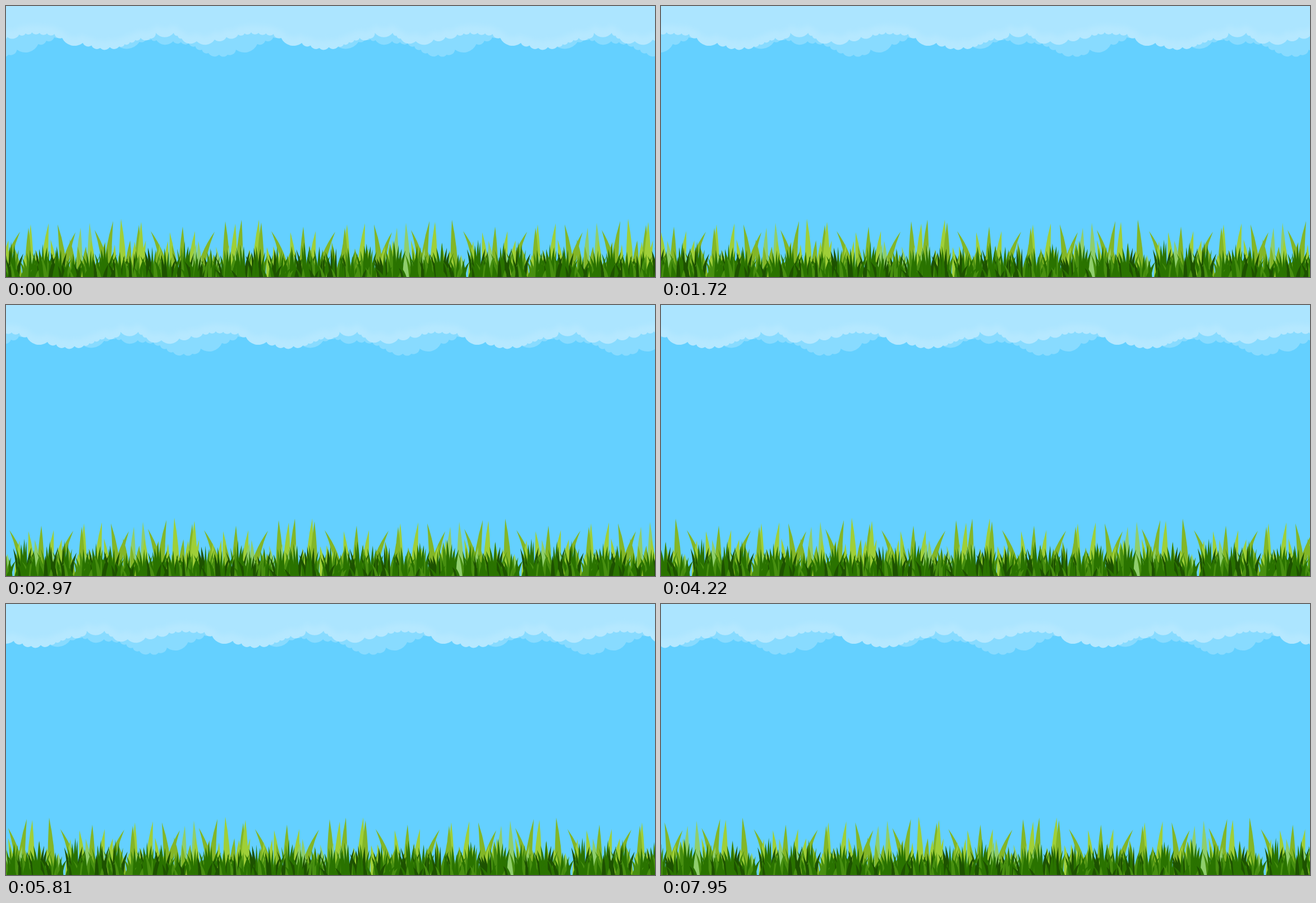
An HTML page that plays this animation: 1157 px wide and 484 px high, repeating every 8 s.

```html
<!DOCTYPE html>
<html lang="en">
<head>
<meta charset="utf-8">
<title>Meadow</title>
<style>
html, body { margin: 0; width: 100%; height: 100%; overflow: hidden; background: #64d0ff; }
svg { display: block; width: 100%; height: 100%; }
</style>
</head>
<body>
<svg viewBox="0 0 1157 484" preserveAspectRatio="none">
  <defs>
    <filter id="soft" x="-5%" y="-20%" width="110%" height="140%"><feGaussianBlur stdDeviation="4"/></filter>
  </defs>
  <rect width="1157" height="484" fill="#64d0ff"/>
  <g id="clouds"></g>
  <g id="grass"></g>
</svg>
<script>
const LOOP = 8000;
const CLOUD_W = 390.5, CLOUD_SPEED = -0.0212;
const GRASS_W = 904, GRASS_SPEED = 0.032;
const FLOOR = 490;
const OLIVE = '#83b627', LIME = '#9fcf38', PALE = '#8fce6c';
const DARK = '#2a7300', DEEP = '#1d5200', MID = '#478f10';

const byId = id => document.getElementById(id);

let seed = 29;
function rand(a, b) {
  seed = (seed * 16807) % 2147483647;
  return a + (b - a) * seed / 2147483647;
}
const pick = list => list[Math.floor(rand(0, list.length))];

// ---- clouds: key points x, y and the number of puffs up to the next one ----
const FRONT = [[100, 57, 1], [137, 66, 2], [168, 75, 2], [202, 72, 4], [240, 57, 1], [257, 58, 1],
  [267, 48, 1], [299, 48, 2], [313, 58, 1], [340, 63, 1], [372, 60, 2], [414, 51, 2],
  [437, 47, 3], [477, 50, 1]];
const BACK = [[100, 50, 2], [195, 68, 1], [238, 64, 1], [250, 58, 2], [268, 61, 1], [298, 63, 2],
  [326, 66, 3], [361, 84, 1], [380, 87, 1], [395, 87, 1], [410, 78, 1], [448, 68, 3]];

function cloud(keys) {
  const [x0, y0] = keys[0];
  let d = `M${x0 - CLOUD_W} -20V${y0}`;
  for (let k = -1; k < 4; k++) {
    keys.forEach(([x, y, puffs], i) => {
      const [nx, ny] = keys[i + 1] || [x0 + CLOUD_W, y0];
      const r = 0.64 * Math.hypot(nx - x, ny - y) / puffs;
      for (let p = 1; p <= puffs; p++) {
        const u = p / puffs;
        d += `A${r} ${r} 0 0 0 ${x + (nx - x) * u + k * CLOUD_W} ${y + (ny - y) * u}`;
      }
    });
  }
  return d + 'V-20Z';
}

byId('clouds').innerHTML =
  `<path d="${cloud(BACK)}" fill="#88dbff"/>` +
  `<path d="${cloud(FRONT)}" fill="#b5e8ff"/>` +
  `<path d="${cloud(FRONT)}" fill="#ace5ff" filter="url(#soft)" transform="translate(0 -15)"/>`;

// ---- grass ----
// The blade rises upright from its base and curves over towards the tip.
function blade(tipX, tipY, baseX, w, fill) {
  const h = w / 2, y = tipY + (FLOOR - tipY) * 0.48;
  const bend = baseX + (tipX - baseX) * 0.12;
  const n = v => v.toFixed(1);
  return `<path fill="${fill}" d="M${n(baseX - h)} ${FLOOR}Q${n(bend - h)} ${n(y)} ${n(tipX)} ${n(tipY)}` +
    `Q${n(bend + h)} ${n(y)} ${n(baseX + h)} ${FLOOR}Z"/>`;
}

// Tall plants, blades as: tip offset, tip y, lean, colour.
const FAN = [[-23, 404, -6, LIME], [22, 402, 7, LIME], [0, 394, 1, OLIVE],
  [-57, 402, -27, OLIVE], [57, 403, 27, OLIVE]];
const STAND = [[93, 396, 3, PALE], [109, 387, -2, PALE], [4, 390, 1, LIME], [36, 388, 8, LIME],
  [0, 396, 0, OLIVE], [52, 390, -11, OLIVE], [84, 404, 22, OLIVE], [118, 400, -22, OLIVE],
  [151, 384, 11, OLIVE]];
const SPIKES = [205, 237, 241, 391, 409, 420, 451, 455, 765, 795];

function plant(blades, ...places) {
  return places.map(x => blades.map(([dx, y, lean, fill]) =>
    blade(x + dx, y, x + dx - lean, 13, fill)).join('')).join('');
}

function tallRow() {
  return SPIKES.map((x, i) => blade(x, rand(380, 392), x + rand(-5, 5), 14, i % 2 ? OLIVE : LIME)).join('') +
    plant(STAND, 40, 604) + plant(FAN, 315, 530, 872);
}

// One row of loose blades: spacing, sway, tip range, width range, colours.
function looseRow(gap, sway, [top, low], [thin, thick], colors) {
  let s = '';
  for (let x = 0; x < GRASS_W; x += gap) {
    const base = x + rand(-gap, gap) / 3;
    s += blade(base + rand(-sway, sway), rand(top, low), base, rand(thin, thick), pick(colors));
  }
  return s;
}

function tuftRow() {
  let s = '';
  const count = 33;
  for (let k = 0; k < count; k++) {
    const x = (k + rand(0.3, 0.7)) * GRASS_W / count, top = rand(416, 440);
    for (const i of [-3, 3, -2, 2, -1, 1, 0]) {
      const side = Math.abs(i);
      s += blade(x + i * 6.5 + rand(-3, 3), top + side * 6 + rand(0, 5), x + i * 3,
        rand(5, 8.5), side ? pick([DARK, DARK, MID, DEEP]) : DARK);
    }
  }
  return s;
}

const rows = [
  tallRow(),
  looseRow(12, 9, [416, 446], [10, 14], [OLIVE, OLIVE, LIME, LIME, PALE]),
  tuftRow(),
  looseRow(7, 14, [444, 472], [5, 8], [DARK, DARK, MID, DEEP]),
];

byId('grass').innerHTML = rows.map((art, i) =>
  `<g id="row${i}">${art}</g>` +
  [-1, 1].map(k => `<use href="#row${i}" x="${k * GRASS_W}"/>`).join('')).join('');

// ---- motion: held poses about 200 ms apart, spread evenly between beats ----
const BEATS = [0, 150, 1160, 1370, 1720, 1930, 2400, 2610, 2970, 3180, 3530, 3800, 4220,
  4400, 4840, 5040, 5810, 6010, 6220, 6970, 7180, 7360, 7950, LOOP];

function held(time) {
  const i = BEATS.findIndex(b => b > time) - 1;
  const from = BEATS[i], span = BEATS[i + 1] - from;
  const step = span / Math.max(1, Math.round(span / 200));
  return from + Math.floor((time - from) / step) * step;
}

function render(time) {
  const t = held(time);
  byId('clouds').setAttribute('transform', `translate(${(t * CLOUD_SPEED).toFixed(2)} 0)`);
  byId('grass').setAttribute('transform', `translate(${(t * GRASS_SPEED).toFixed(2)} 0)`);
}

const start = performance.now();
function tick() {
  render(Math.max(0, performance.now() - start) % LOOP);
  requestAnimationFrame(tick);
}
render(0);
requestAnimationFrame(tick);
</script>
</body>
</html>
```
